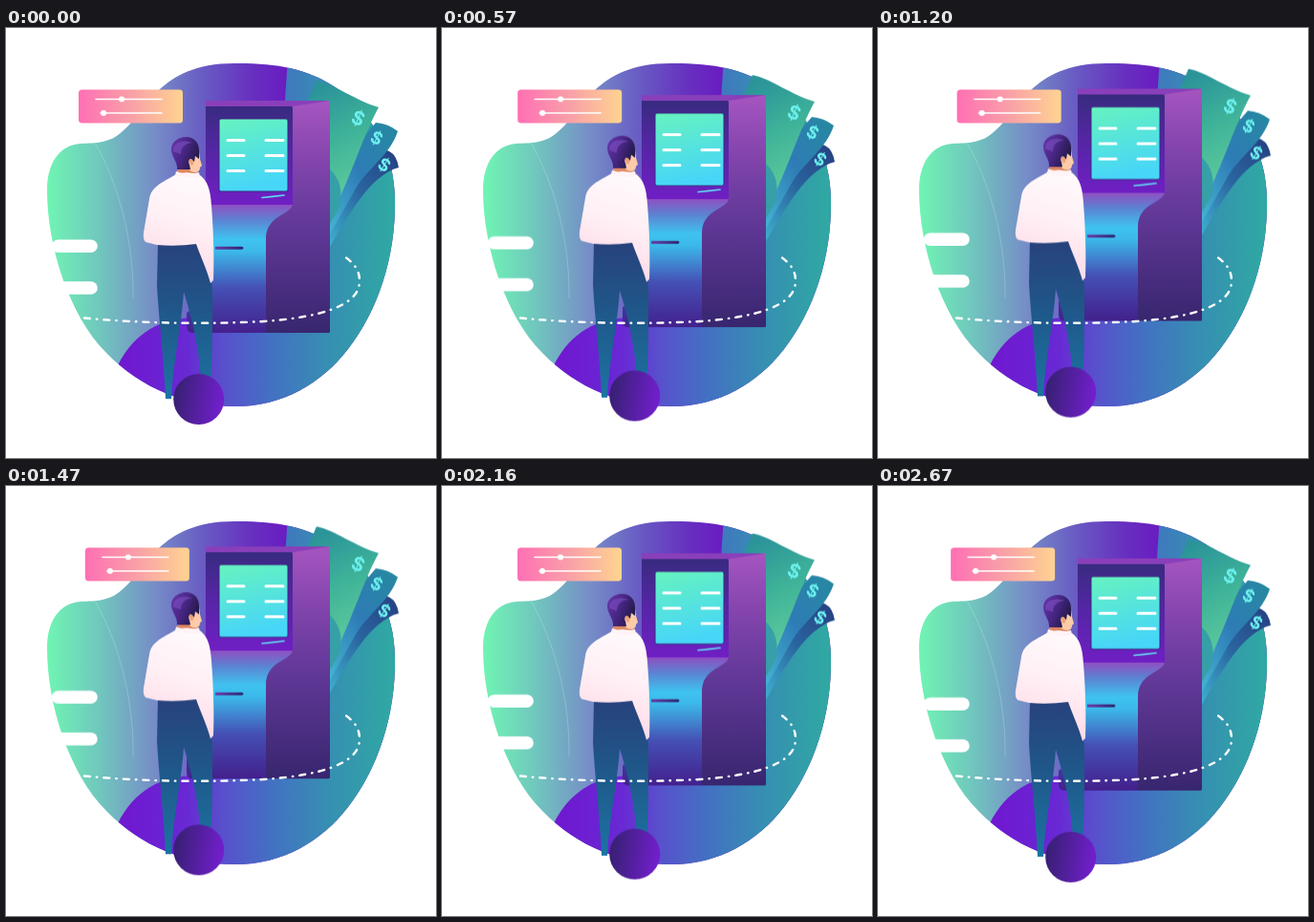
Recreate the animation shown at these times as an HTML page. Size 450 by 450 pixels, loop 2.7 s.

```html
<!DOCTYPE html>
<html lang="en">
<head>
<meta charset="utf-8">
<title>Cash machine</title>
<style>
  html, body { margin: 0; width: 100%; height: 100%; overflow: hidden; background: #fff; }
  svg { display: block; width: 100%; height: 100%; }
  text { font: 700 20px Inter, sans-serif; fill: #6cf0ee; text-anchor: middle; dominant-baseline: central; }
  .line { fill: none; stroke: #fff; stroke-linecap: round; }
</style>
</head>
<body>
<svg viewBox="0 0 450 450">
  <defs>
    <linearGradient id="sky" gradientUnits="userSpaceOnUse" x1="43" y1="0" x2="300" y2="0">
      <stop offset="0" stop-color="#70f5b3"/>
      <stop offset=".2" stop-color="#70cabd"/>
      <stop offset=".43" stop-color="#768fc7"/>
      <stop offset=".65" stop-color="#6858c3"/>
      <stop offset=".84" stop-color="#672fbf"/>
      <stop offset="1" stop-color="#6a19c2"/>
    </linearGradient>
    <linearGradient id="hill" gradientUnits="userSpaceOnUse" x1="117" y1="0" x2="407" y2="0">
      <stop offset="0" stop-color="#7017d0"/>
      <stop offset=".25" stop-color="#6829d4"/>
      <stop offset=".38" stop-color="#5850cc"/>
      <stop offset=".55" stop-color="#4370c3"/>
      <stop offset=".76" stop-color="#368fb2"/>
      <stop offset="1" stop-color="#2fa9a2"/>
    </linearGradient>
    <linearGradient id="panel">
      <stop offset="0" stop-color="#ff70b4"/>
      <stop offset=".5" stop-color="#f9a0a8"/>
      <stop offset="1" stop-color="#ffd490"/>
    </linearGradient>
    <linearGradient id="side" x2="0" y2="1">
      <stop offset="0" stop-color="#a655c0"/>
      <stop offset=".25" stop-color="#8445ad"/>
      <stop offset=".5" stop-color="#653a9b"/>
      <stop offset="1" stop-color="#38266f"/>
    </linearGradient>
    <linearGradient id="front" x2="0" y2="1">
      <stop offset="0" stop-color="#8f50c2"/>
      <stop offset=".12" stop-color="#5c83d2"/>
      <stop offset=".27" stop-color="#3fc3f0"/>
      <stop offset=".36" stop-color="#3cb9ea"/>
      <stop offset=".65" stop-color="#4550b5"/>
      <stop offset="1" stop-color="#43208c"/>
    </linearGradient>
    <linearGradient id="frame" x2="0" y2="1">
      <stop offset="0" stop-color="#382b80"/>
      <stop offset=".45" stop-color="#5426a4"/>
      <stop offset="1" stop-color="#701fc4"/>
    </linearGradient>
    <linearGradient id="screen" x2=".2" y2="1">
      <stop offset="0" stop-color="#66f3c0"/>
      <stop offset="1" stop-color="#47d6f8"/>
    </linearGradient>
    <linearGradient id="slot">
      <stop offset="0" stop-color="#6a3aa8"/>
      <stop offset="1" stop-color="#29246c"/>
    </linearGradient>
    <linearGradient id="bill1" x1=".4" y1="0" x2=".6" y2=".8">
      <stop offset="0" stop-color="#2b9499"/>
      <stop offset=".5" stop-color="#3fb399"/>
      <stop offset="1" stop-color="#5cc99c"/>
    </linearGradient>
    <linearGradient id="bill2" x1="1" y1="0" x2="0" y2="1">
      <stop offset="0" stop-color="#26899f"/>
      <stop offset=".5" stop-color="#2e7cb6"/>
      <stop offset="1" stop-color="#45b4d2"/>
    </linearGradient>
    <linearGradient id="bill3" x1="1" y1="0" x2="0" y2="1">
      <stop offset="0" stop-color="#263f82"/>
      <stop offset=".5" stop-color="#2a659f"/>
      <stop offset="1" stop-color="#3fafd0"/>
    </linearGradient>
    <linearGradient id="hair" x2="1" y2=".5">
      <stop offset="0" stop-color="#6a38b0"/>
      <stop offset=".55" stop-color="#472684"/>
      <stop offset="1" stop-color="#241a4a"/>
    </linearGradient>
    <linearGradient id="shirt" x1=".6" y1="0" x2=".4" y2="1">
      <stop offset="0" stop-color="#fffafc"/>
      <stop offset=".45" stop-color="#fff0f5"/>
      <stop offset="1" stop-color="#ffd5e5"/>
    </linearGradient>
    <linearGradient id="jeans" x2="0" y2="1">
      <stop offset="0" stop-color="#28427c"/>
      <stop offset=".4" stop-color="#205588"/>
      <stop offset="1" stop-color="#1b74a2"/>
    </linearGradient>
    <linearGradient id="ball" x2="1" y2=".15">
      <stop offset="0" stop-color="#33206c"/>
      <stop offset="1" stop-color="#701fca"/>
    </linearGradient>
    <path id="blob" d="M43 170C43 142 55 123 78 121C95 120 108 121 122 108C138 94 145 78 160 65C176 50 200 36 243 37C285 37 315 43 343 61C383 87 407 131 407 180C408 240 389 296 358 336C330 372 290 396 240 396C189 396 142 378 105 340C66 301 43 228 43 170Z"/>
    <clipPath id="inside"><use href="#blob"/></clipPath>
  </defs>

  <use href="#blob" fill="url(#sky)"/>
  <g clip-path="url(#inside)">
    <path d="M117 353C135 317 165 302 202 303H270L291 90L295 30H420V410H117Z" fill="url(#hill)"/>
    <path class="line" d="M94 122C116 160 134 220 133 283" stroke-width=".7" opacity=".3"/>
  </g>

  <g class="line" data-move="0 -8" stroke-width="13.5">
    <path d="M54.5 228.3H89"/>
    <path d="M50 272H89"/>
  </g>

  <g data-move="7.5 0">
    <rect x="76" y="64.5" width="109" height="35" rx="3.5" fill="url(#panel)"/>
    <path class="line" d="M94 74.5H163M99 89H163" stroke-width="1.5"/>
    <circle cx="121" cy="74.5" r="3" fill="#fff"/>
    <circle cx="102" cy="89" r="3" fill="#fff"/>
  </g>

  <g data-move="0 -14">
    <path d="M384 132Q396 126 401 129Q409 133 411 146C381 154 360 194 339 229V195C352 168 365 145 384 132Z" fill="url(#bill3)"/>
    <path d="M387 99Q400 100 410 108C402 133 380 145 366 168L339 216V180C352 145 370 118 387 99Z" fill="url(#bill2)"/>
    <path d="M325 55C344 59 366 76 390 83C374 112 364 148 339 200H316V76Z" fill="url(#bill1)"/>
    <path d="M338 147Q355 162 349 188L339 205Z" fill="#379fa8"/>
    <text transform="translate(368.5 94.5) rotate(24)">$</text>
    <text transform="translate(388 115) rotate(28)" style="font-size:18px">$</text>
    <text transform="translate(396 143) rotate(32)" style="font-size:18px">$</text>

    <rect x="209" y="76" width="130" height="243" rx="1.5" fill="url(#side)"/>
    <path d="M209 82V76H339L300 82Z" fill="#8a3fba"/>
    <path d="M209 185H300C297 196 272 196 272 221V319H195Q189 319 189 312V298Q209 286 209 262Z" fill="url(#front)"/>
    <path d="M209 82H299Q300 82 300 84V185H209Z" fill="url(#frame)"/>
    <rect x="223" y="95" width="72" height="76" rx="2" fill="url(#screen)" stroke="#3c277f"/>
    <path class="line" d="M232 117.5H249M272 117.5H290M232 133.5H249M272 133.5H290M232 149.5H249M272 149.5H290" stroke-width="3"/>
    <path d="M268 177.5L279 176.3L291 175" fill="none" stroke="#62d8f2" stroke-width="1.7" stroke-linecap="round"/>
    <path d="M219 228.8H247Q250 230.3 247 231.8H219Z" fill="url(#slot)"/>
  </g>

  <g data-move="0 -3">
    <path d="M159 225H207C212 240 217 262 216 290C216 320 216 345 214 372H204C203 340 196 308 186 276C184 310 175 348 173 388H167C165 345 160 305 158 270Z" fill="url(#jeans)"/>
    <path d="M179 138H200V153Q190 156 179 154Z" fill="#dc8660"/>
    <path d="M192 130H202L203 137L205 144L203 146Q203 151 198 151Q192 151 190 145Z" fill="#fdcba8"/>
    <path d="M178 153Q190 149 203 154C211 160 214 169 215 186C217 211 218 240 217 264L214 267C210 252 204 240 199 226Q178 229 158 227L146 224Q143 221 144 214L150 179C152 166 163 162 178 153Z" fill="url(#shirt)"/>
    <path d="M178 150Q190 155 202 151L203 156Q190 159 177 154Z" fill="#fff3f6"/>
    <path d="M179 148C180 140 173 135 173 127C173 119 181 114 188 114C197 114 202 120 202 128V137L198 134L197 140L193 137Q190 139 192 143L193 148Z" fill="url(#hair)"/>
    <path d="M175 129C175 120 184 116 195 120C187 121 183 125 183 132Z" fill="#7d50c2" opacity=".6"/>
    <path d="M191.5 138Q195 135 196 140T193 143Z" fill="#eba27c"/>
  </g>

  <circle data-move="0 -8.4" cx="201.7" cy="388.5" r="26.5" fill="url(#ball)"/>
  <path class="line" d="M82 303.5C145 309.5 215 310 270 307C325 303 370 292 370 265C370 252 363 245 353 238.5" stroke-width="2.4" stroke-dasharray="6 7 .5 7"/>
</svg>
<script>
  // Each marked part drifts out and back in a straight line.
  for (const part of document.querySelectorAll('[data-move]')) {
    const [x, y] = part.dataset.move.split(' ');
    part.animate(
      { transform: ['translate(0px, 0px)', `translate(${x}px, ${y}px)`] },
      { duration: 1350, direction: 'alternate', iterations: Infinity, easing: 'linear' }
    );
  }
</script>
</body>
</html>
```
